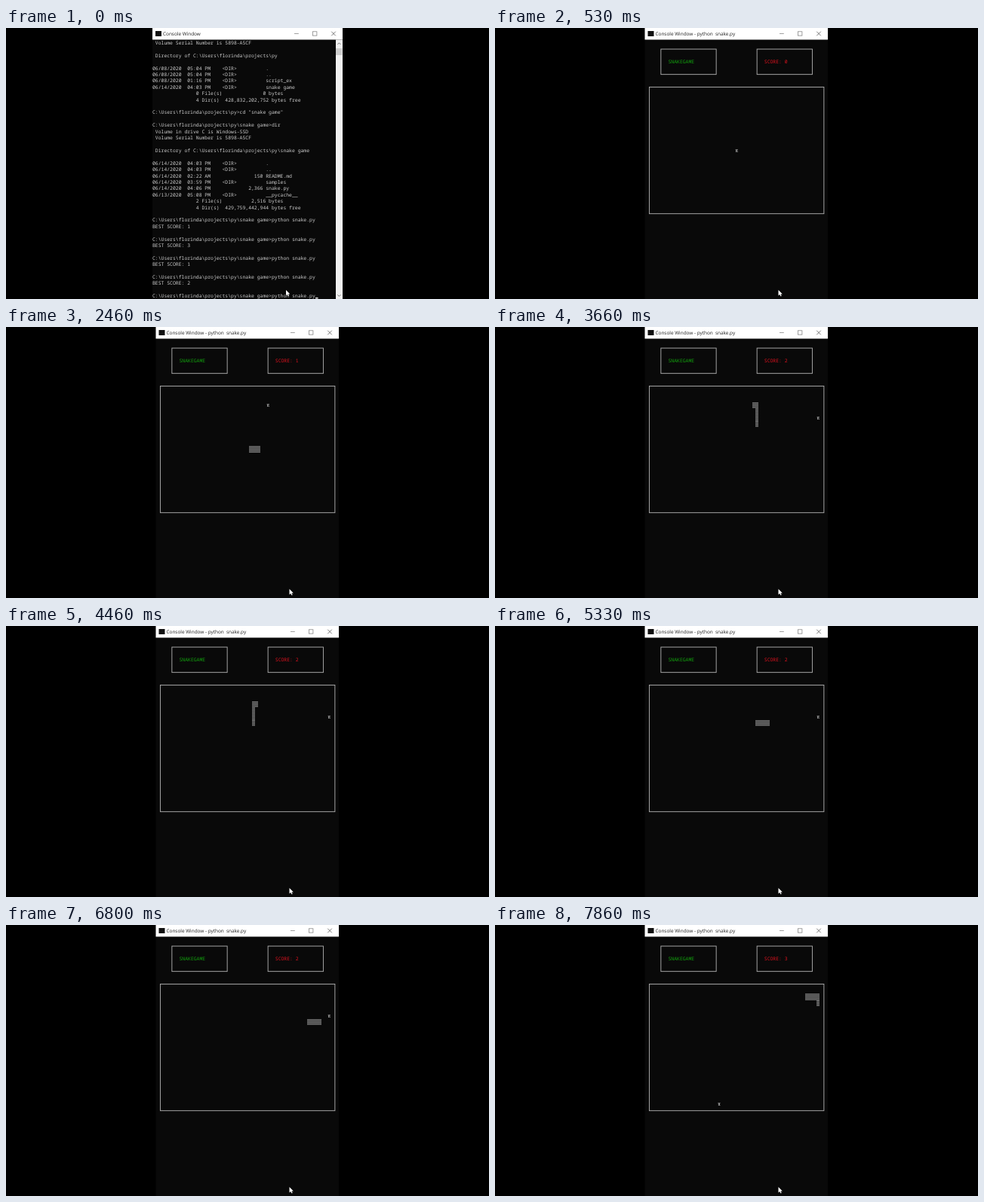
Write an HTML page with a canvas that moves like this. It is 640 px wide and 360 px high and loops after 8 s.

```html
<!DOCTYPE html>
<html lang="en">
<head>
<meta charset="utf-8">
<title>Snake in a terminal</title>
<style>
  html, body { margin: 0; width: 100%; height: 100%; overflow: hidden; background: #000; }
  canvas { display: block; }
</style>
</head>
<body>
<canvas id="stage" width="640" height="360"></canvas>
<script>
const ctx = document.getElementById('stage').getContext('2d');

const LOOP = 8000, GAME_START = 530, TICK = 1000 / 15;
const CELL_W = 3.857, CELL_H = 8.41;
const BG = '#090909', INK = '#cccccc';
const MONO = '6.43px "Noto Sans Mono", "DejaVu Sans Mono", monospace';
const SANS = '6.42px "Open Sans", "Noto Sans", sans-serif';
const APP = 'Console Window';

function rect(x, y, w, h, color) {
  ctx.fillStyle = color;
  ctx.fillRect(x, y, w, h);
}

function text(str, x, y, color, font = MONO) {
  ctx.font = font;
  ctx.fillStyle = color;
  ctx.fillText(str, x, y);
}

function path(points, color, width = 0.8) {
  ctx.beginPath();
  points.forEach(([x, y], i) => i ? ctx.lineTo(x, y) : ctx.moveTo(x, y));
  ctx.strokeStyle = color;
  ctx.lineWidth = width;
  ctx.stroke();
}

function pointer(x, y) {
  const shape = [[0, 0], [0, 7.6], [1.8, 6], [3, 8.6], [4.2, 8], [3.1, 5.5], [5.4, 5.4]];
  ctx.beginPath();
  shape.forEach(([dx, dy]) => ctx.lineTo(x + dx, y + dy));
  ctx.closePath();
  ctx.strokeStyle = '#000';
  ctx.lineWidth = 0.8;
  ctx.stroke();
  ctx.fillStyle = '#fff';
  ctx.fill();
}

function windowFrame(left, right, title) {
  rect(0, 0, 640, 360, '#000');
  rect(left, 0, right - left, 360, BG);
  rect(left, 0, right - left, 15.5, '#fff');
  rect(left + 4, 4, 8, 7, '#111');
  text(title, left + 14, 10, '#222', SANS);
  const mid = right - 36.8;
  path([[mid - 27.2, 7.5], [mid - 21.4, 7.5]], '#777', 0.7);
  ctx.strokeRect(mid - 2.6, 4.8, 5.3, 5.3);
  const x = right - 12;
  path([[x - 2.8, 4.7], [x + 2.8, 10.3]], '#444', 0.7);
  path([[x - 2.8, 10.3], [x + 2.8, 4.7]], '#444', 0.7);
}

// Directory listing before the game starts

const HOME = 'C:\\Users\\florinda\\projects\\py';
const GAME_DIR = HOME + '\\snake game';
const RUN = GAME_DIR + '>python snake.py';

const entry = (date, time, name, size) =>
  `${date}/2020  ${time} ` + (size ? size.padStart(17) : '   <DIR>'.padEnd(17)) + ' ' + name;
const totals = (files, bytes, dirs, free) => [
  `${files} File(s) `.padStart(25) + `${bytes} bytes`.padStart(20),
  `${dirs} Dir(s)  `.padStart(25) + `${free} bytes free`
];
const run = score => [RUN, 'BEST SCORE: ' + score, ''];

const LISTING = [
  ' Volume Serial Number is 5898-A5CF',
  '',
  ' Directory of ' + HOME,
  '',
  entry('06/08', '05:04 PM', '.'),
  entry('06/08', '05:04 PM', '..'),
  entry('06/08', '01:16 PM', 'script_ex'),
  entry('06/14', '04:03 PM', 'snake game'),
  ...totals(0, '0', 4, '428,832,202,752'),
  '',
  HOME + '>cd "snake game"',
  '',
  GAME_DIR + '>dir',
  ' Volume in drive C is Windows-SSD',
  ' Volume Serial Number is 5898-A5CF',
  '',
  ' Directory of ' + GAME_DIR,
  '',
  entry('06/14', '04:03 PM', '.'),
  entry('06/14', '04:03 PM', '..'),
  entry('06/14', '02:22 AM', 'README.md', '150'),
  entry('06/14', '03:59 PM', 'samples'),
  entry('06/14', '04:06 PM', 'snake.py', '2,366'),
  entry('06/13', '05:08 PM', '__pycache__'),
  ...totals(2, '2,516', 4, '429,759,442,944'),
  '',
  ...run(1), ...run(3), ...run(1), ...run(2),
  RUN
];

function drawListing() {
  windowFrame(194, 446, APP);
  LISTING.forEach((line, i) => text(line, 194, 21.9 + i * CELL_H, INK));
  rect(194 + RUN.length * CELL_W, 358, 3.5, 1.5, '#eee');
  rect(437, 15.5, 9, 344.5, '#f0f0f0');
  rect(437, 27, 8.5, 9, '#cdcdcd');
  path([[439.4, 21.8], [441.4, 19.8], [443.4, 21.8]], '#555');
  path([[439.4, 354.4], [441.4, 356.4], [443.4, 354.4]], '#555');
  pointer(371, 348);
}

// Game: character grid with its origin at the board's top left corner

const colX = c => 202.5 + c * CELL_W;
const rowY = r => 78.5 + r * CELL_H;

const TURNS = [['R', 22], ['U', 7], ['L', 5], ['D', 3], ['R', 26], ['U', 4], ['L', 8]];
const DIRS = { R: [1, 0], L: [-1, 0], U: [0, -1], D: [0, 1] };
const TRAIL = [[15, 10]];
for (const [dir, count] of TURNS) {
  for (let i = 0; i < count; i++) {
    const [x, y] = TRAIL[TRAIL.length - 1];
    TRAIL.push([x + DIRS[dir][0], y + DIRS[dir][1]]);
  }
}

const FOODS = [[30, 10], [37, 3], [58, 5], [24, 19]];
const EATEN = FOODS.slice(0, 3).map(([fx, fy]) =>
  TRAIL.findIndex(([x, y]) => x === fx && y === fy));

// [step, ms]: the pace of the game, linear in between
const PACE = [[0, 520], [20, 2550], [46, 5332], [71, 7865], [72, 7966]];

function stepAt(t) {
  t = Math.floor((t + 7) / TICK) * TICK;
  let i = 0;
  while (i < PACE.length - 2 && t >= PACE[i + 1][1]) i++;
  const [n0, t0] = PACE[i], [n1, t1] = PACE[i + 1];
  return Math.max(0, Math.floor(n0 + (n1 - n0) * (t - t0) / (t1 - t0)));
}

function frameBox(c0, r0, c1, r1) {
  const x = colX(c0 + 0.5), y = rowY(r0);
  ctx.strokeStyle = '#b4b4b4';
  ctx.lineWidth = 0.9;
  ctx.strokeRect(x, y, colX(c1 + 0.5) - x, rowY(r1) - y);
}

function gridText(str, c, r, color) {
  text(str, colX(c), rowY(r) + 2.2, color);
}

function snakeCell([c, r]) {
  const x = Math.round(colX(c)), w = Math.round(colX(c + 1)) - x;
  const top = Math.round(rowY(r - 0.5)), bottom = Math.round(rowY(r + 0.5));
  rect(x, top, w, bottom - top, '#444');
  for (let y = top; y < bottom; y += 2) rect(x, y, w, 1, '#6c6c6c');
}

function drawGame(t) {
  const step = stepAt(t);
  const score = EATEN.filter(n => step >= n).length;
  windowFrame(198.5, 441, APP + ' - python  snake.py');
  frameBox(4, -6, 23, -2);
  frameBox(37, -6, 56, -2);
  frameBox(0, 0, 60, 20);
  gridText('SNAKEGAME', 7, -4, '#13a10e');
  gridText('SCORE: ' + score, 40, -4, '#e0121f');
  gridText('π', FOODS[score][0], FOODS[score][1], '#f2f2f2');
  // the starting cell is never painted
  TRAIL.slice(Math.max(1, step - 2 - score), step + 1).forEach(snakeCell);
  pointer(375.5, 348);
}

function draw(now) {
  const t = now % LOOP;
  ctx.textRendering = 'geometricPrecision';
  if (t < GAME_START) drawListing();
  else drawGame(t);
  requestAnimationFrame(draw);
}
draw(0);
</script>
</body>
</html>
```
